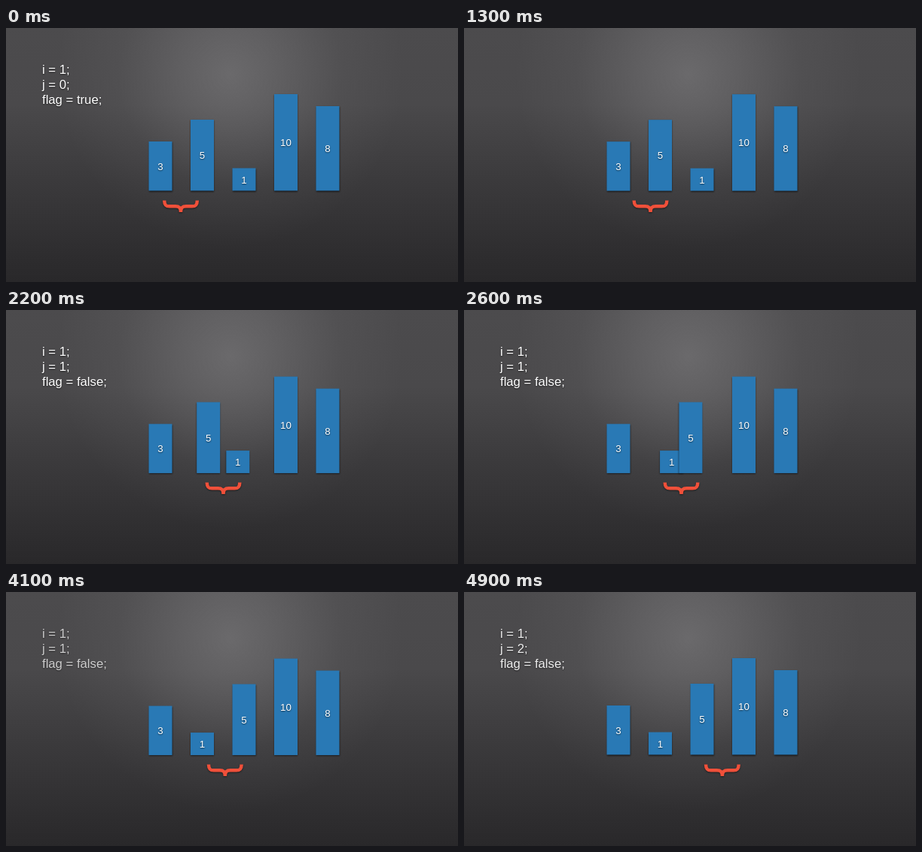
Write an HTML page with a canvas that moves like this. It is 600 by 338 pixels and loops after 5 s.

```html
<!DOCTYPE html>
<html>
<head>
<meta charset="utf-8">
<style>
  html, body { margin: 0; width: 100%; height: 100%; overflow: hidden; background: #2a292b; }
  canvas { display: block; }
</style>
</head>
<body>
<canvas id="stage" width="600" height="338"></canvas>
<script>
const ctx = document.getElementById('stage').getContext('2d');
const LOOP = 5000, GAP = 55.5, FLOOR = 216.5, BAR_W = 31;
const FONT = '"Liberation Sans", Arial, sans-serif';
// Start times of the three one-second moves
const STEP_1 = 950, SWAP = 1950, STEP_2 = 3970;

const clamp = v => Math.max(0, Math.min(1, v));
const ease = u => (1 - Math.cos(Math.PI * u)) / 2;
const phase = (t, start) => clamp((t - start) / 1000);
const fadeOut = u => 1 - clamp((u - 0.08) / 0.2);
const fadeIn = u => clamp((u - 0.73) / 0.22);

function gradient(g, stops) {
  stops.forEach(([at, color]) => g.addColorStop(at, color));
  return g;
}
const backdrop = gradient(ctx.createLinearGradient(0, 0, 0, 338),
  [[0, '#4c4b4d'], [0.3, '#4a494b'], [0.6, '#3b3a3c'], [1, '#29282a']]);
const glow = gradient(ctx.createRadialGradient(298, 62, 0, 298, 62, 230),
  [[0, 'rgba(150,149,151,.42)'], [0.3, 'rgba(150,149,151,.27)'],
   [0.65, 'rgba(150,149,151,.08)'], [1, 'rgba(150,149,151,0)']]);

function shadow(blur, y, alpha) {
  ctx.shadowBlur = blur;
  ctx.shadowOffsetY = y;
  ctx.shadowColor = `rgba(0,0,0,${alpha})`;
}

function label(text, x, y, size, align) {
  ctx.font = `${size}px ${FONT}`;
  ctx.textAlign = align;
  ctx.fillStyle = '#fff';
  shadow(2, 1, 0.6);
  ctx.fillText(text, x, y);
}

function bar(value, slot, height, dy) {
  const x = 189.5 + slot * GAP, top = FLOOR - height + dy;
  shadow(2, 1, 0.6);
  ctx.fillStyle = '#2979b5';
  ctx.fillRect(x, top, BAR_W, height);
  label(value, x + BAR_W / 2, top + height / 2 + 5, 13.3, 'center');
}

function brace(x) {
  ctx.save();
  ctx.translate(x, 0);
  shadow(2, 1, 0.5);
  ctx.strokeStyle = '#f0503a';
  ctx.lineWidth = 4.5;
  ctx.stroke(new Path2D('M-21.8 229.5 C-21.8 235.5 -20 237.3 -15 237.3 H-7 C-2 237.3 0 239 0 245 ' +
    'C0 239 2 237.3 7 237.3 H15 C20 237.3 21.8 235.5 21.8 229.5'));
  ctx.restore();
}

function notes(j, flag, alpha) {
  if (alpha <= 0) return;
  ctx.globalAlpha = alpha;
  ['i = 1;', `j = ${j};`, `flag = ${flag};`].forEach((line, n) =>
    label(line, 48, 61 + n * 20, 16.7, 'left'));
  ctx.globalAlpha = 1;
}

function draw(t) {
  const u1 = phase(t, STEP_1), u3 = phase(t, STEP_2);
  const p1 = ease(u1), swap = ease(phase(t, SWAP)), p3 = ease(u3);
  const dy = 0.6 * (p1 - p3);

  shadow(0, 0, 0);
  for (const fill of [backdrop, glow]) {
    ctx.fillStyle = fill;
    ctx.fillRect(0, 0, 600, 338);
  }

  bar(3, 0, 65.5, dy);
  bar(1, 2 - swap, 30, dy);
  bar(5, 1 + swap, 94.5, dy);
  bar(10, 3, 128.5, dy);
  bar(8, 4, 112.5, dy);
  brace(232 + 56.5 * p1 + 55 * p3);

  notes(0, true, fadeOut(u1));
  notes(1, false, fadeIn(u1) * fadeOut(u3));
  notes(2, false, fadeIn(u3));
}

const began = performance.now();
function tick() {
  draw((performance.now() - began) % LOOP);
  requestAnimationFrame(tick);
}
tick();
</script>
</body>
</html>
```
